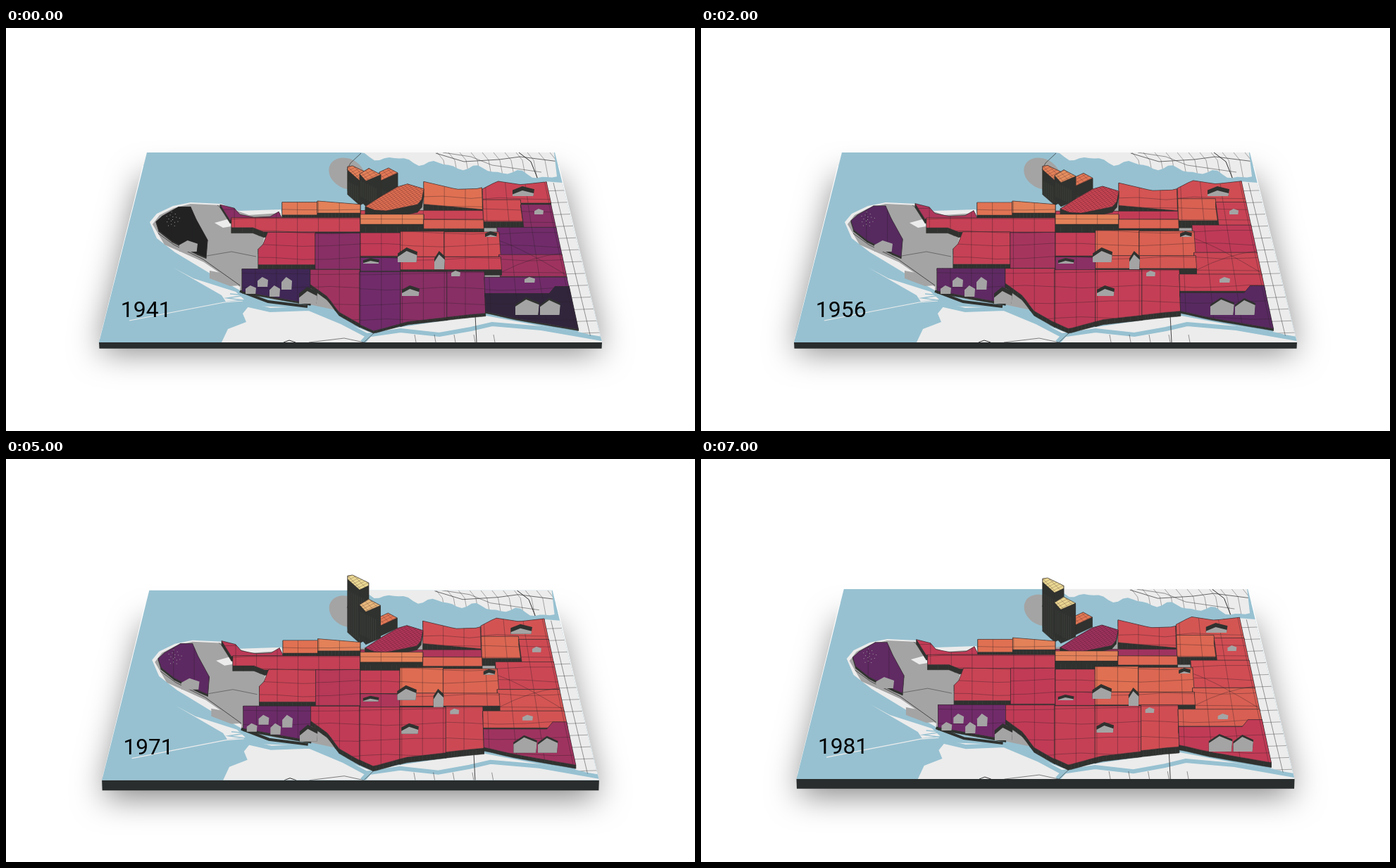
Write an HTML page with a canvas that moves like this. It is 978x573 px and loops after 8 s.

```html
<!DOCTYPE html>
<html lang="en">
<head>
<meta charset="utf-8">
<title>City density by year</title>
<style>
html, body { margin: 0; width: 100%; height: 100%; overflow: hidden; background: #fff; }
canvas { display: block; width: 978px; height: 573px; }
</style>
</head>
<body>
<canvas id="map" width="978" height="573"></canvas>
<script>
const ctx = document.getElementById('map').getContext('2d');
const STEP = 1000, STEPS = 8;
const SEA = '#97c1d1', LAND = '#ececec', PARK = '#a4a4a4', WALL = '#30322f', ROAD = '#303030';

const pts = s => s.split(' ').map(p => p.split(',').map(Number));
const sigmoid = t => 1 / (1 + Math.exp(-t));
const mix = (a, b, t) => a + (b - a) * t;

// Piecewise linear curve through a few key points
const through = s => {
  const p = pts(s);
  return x => {
    let i = 1;
    while (i < p.length - 1 && x > p[i][0]) i++;
    const [ax, ay] = p[i - 1], [bx, by] = p[i];
    return mix(ay, by, Math.min(1, Math.max(0, (x - ax) / (bx - ax))));
  };
};

// Density runs from 0 to 16
const SHADES = ['#222222', '#3f2756', '#712b6a', '#9f335f', '#c13b56', '#d04d53', '#e07052', '#e59260', '#ead993'];
function shade(density) {
  const i = Math.min(7, Math.floor(density / 2)), t = density / 2 - i;
  const channel = n => Math.round(mix(
    parseInt(SHADES[i].slice(n, n + 2), 16), parseInt(SHADES[i + 1].slice(n, n + 2), 16), t));
  return `rgb(${channel(1)},${channel(3)},${channel(5)})`;
}
const blockHeight = density => 1.5 + .4 * density + .035 * density ** 2;

// Streets are upright in the west and lean out towards the east
const street = (x, y) => x + (y - 250) * Math.max(0, x - 660) * .0019;
const harbour = through('593,220 640,231 673,230 700,217 735,222 774,218');
const river = through('432,363 457,381 472,402 500,418 522,428 570,415 677,403 706,412 774,428');

// A block between two streets and two edges; an edge is a height or a curve
function cell(west, east, north, south) {
  const n = 12, out = [];
  const add = (x, edge) => {
    const y = typeof edge === 'function' ? edge(x) : edge;
    out.push([street(x, y), y]);
  };
  for (let i = 0; i <= n; i++) add(mix(west, east, i / n), north);
  for (let i = n; i >= 0; i--) add(mix(west, east, i / n), south);
  return out;
}

// Density moves from the first to the last year along a power curve
const district = (outline, first, last, pace = .35) =>
  ({ outline, density: i => mix(first, last, (i / (STEPS - 1)) ** pace) });

const CAMPUS = district(pts('213,274 222,266 245,253 262,253 270,271 286,300 284,325 272,320 236,302 217,287'), 0, 3.3, .1);
const POINT = district(pts('304,250 324,255 332,264 352,268 375,267 387,260 393,272 318,272'), 5, 8);
const CORE = district(pts('510,256 535,240 556,228 570,224 593,231 590,246 584,253 540,262 523,261'), 12, 6, .6);

// Back to front
const BACK = [
  CAMPUS,
  district(cell(677, 774, harbour, 248), 9, 10.5),
  district(cell(593, 676, harbour, x => 252 + (x - 593) * .09), 12, 10, .2),
  district(cell(503, 677, 260, 275), 9, 6, 1)
];
const FRONT = [
  district(cell(677, 731, 243, 274), 10, 11.5, .2),
  POINT,
  district(cell(392, 442, 248, 266), 12.5, 12),
  district(cell(442, 503, x => 246 + (x - 442) * .08, 263), 13, 13),
  district(cell(731, 774, 248, 281), 5, 10, .2),
  district(cell(320, 503, 270, x => x < 362 ? 284 : 290), 9, 8.5),
  district(cell(503, 593, 265, 279), 13, 13),
  district(cell(593, 677, 272, 285), 11, 11.5),
  district(cell(695, 774, 281, 320), 4, 10),
  district(cell(358, 439, x => x < 370 ? 314 - (x - 358) : 290, 336), 8, 9),
  district(cell(439, 503, 291, 342), 5, 8, .6),
  district(cell(503, 560, 291, 324), 8, 8.5),
  district(cell(560, 622, 288, 324), 10, 12),
  district(cell(622, 697, 289, 324), 10, 11.5, .25),
  district(cell(695, 774, 320, 351), 6, 11),
  district(cell(503, 560, 326, 345), 4, 8, 1),
  district(cell(560, 697, 324, 342), 9, 11, .2),
  district(cell(335, 432, 342, x => 374 + (x - 335) * .18), 2, 4),
  district(cell(432, 502, 342, river), 6, 8, .1),
  district(cell(502, 560, 344, river), 4, 8.5, .15),
  district(cell(560, 626, 344, river), 5, 9, .15),
  district(cell(626, 676, 344, river), 5, 10, .3),
  district(cell(676, 774, 351, 375), 4, 11, .3),
  district(cell(676, 774, x => x < 755 ? 377 : 367, river), 1, 8, 1)
];

// Towers: outline at ground level
const TOWERS = [
  {
    outline: pts('485,232 492,231 515,242 515,246 502,252 485,237'),
    height: i => 35 + 41 * sigmoid((i - 3.4) * 3) - 3 * Math.max(0, i - 5),
    density: i => 13 + 3 * sigmoid((i - 3.2) * 3)
  },
  {
    outline: pts('530,230 543,224 556,231 532,242'),
    height: i => 14 + 11 * Math.exp(-i / 1.8),
    density: () => 12.5
  },
  {
    outline: pts('502,244 515,236 532,245 511,254'),
    height: i => 34 + 2.5 * Math.exp(-i) + 14 * sigmoid((i - 4.3) * 3),
    density: i => 13 + i * .42
  }
];

function trace(p, dy = 0) {
  ctx.beginPath();
  p.forEach(([x, y], i) => i ? ctx.lineTo(x, y + dy) : ctx.moveTo(x, y + dy));
}
function fill(p, color, dy = 0) {
  trace(p, dy);
  ctx.closePath();
  ctx.fillStyle = color;
  ctx.fill();
}
function line(path, color, width) {
  trace(pts(path));
  ctx.strokeStyle = color;
  ctx.lineWidth = width;
  ctx.stroke();
}
function clipped(p, dy, draw) {
  ctx.save();
  trace(p, dy);
  ctx.closePath();
  ctx.clip();
  ctx.translate(0, dy);
  draw();
  ctx.restore();
}

function streets() {
  ctx.beginPath();
  for (let x = 205; x < 800; x += 29.8) {
    ctx.moveTo(street(x, 210), 210);
    ctx.lineTo(street(x, 440), 440);
  }
  for (let y = 242, gap = 15; y < 430; y += gap++) {
    ctx.moveTo(300, y);
    for (let x = 340; x <= 820; x += 40) ctx.lineTo(x, y + 2 * Math.sin(x * y));
  }
  ctx.moveTo(700, 300);
  ctx.quadraticCurveTo(735, 312, 797, 350);
  ctx.moveTo(703, 345);
  ctx.quadraticCurveTo(748, 322, 789, 318);
  ctx.strokeStyle = 'rgba(42,32,38,.5)';
  ctx.lineWidth = .7;
  ctx.stroke();
}

function fineGrid(gap) {
  ctx.beginPath();
  for (let x = 240; x < 780; x += gap) {
    ctx.moveTo(x, 140);
    ctx.lineTo(x + 130, 270);
    ctx.moveTo(x, 280);
    ctx.lineTo(x + 260, 150);
  }
  ctx.strokeStyle = 'rgba(60,20,30,.45)';
  ctx.lineWidth = .6;
  ctx.stroke();
}

function block(outline, dy, height, color, pattern) {
  ctx.fillStyle = ctx.strokeStyle = WALL;
  ctx.lineWidth = .5;
  outline.forEach(([ax, ay], i) => {
    const [bx, by] = outline[(i + 1) % outline.length];
    trace([[ax, ay], [bx, by], [bx, by + height], [ax, ay + height]], dy);
    ctx.closePath();
    ctx.fill();
    ctx.stroke();
  });
  fill(outline, color, dy);
  clipped(outline, dy, pattern);
  trace(outline, dy);
  ctx.closePath();
  ctx.strokeStyle = 'rgba(48,40,44,.6)';
  ctx.lineWidth = .7;
  ctx.stroke();
}

// Outlines show the roofs at step 1
function drawDistrict(d, i, pattern = streets) {
  const h = blockHeight(d.density(i));
  block(d.outline, blockHeight(d.density(1)) - h, h, shade(d.density(i)), pattern);
}

function drawTower(t, i) {
  const h = t.height(i), left = t.outline[0][0];
  block(t.outline, -h, h, shade(t.density(i)), () => fineGrid(9));
  ctx.beginPath();
  for (let x = left + 2; x < left + 26; x += 3) {
    const y = 239 + (x - left) * .5;
    ctx.moveTo(x, y - h + 14);
    ctx.lineTo(x, y);
  }
  ctx.strokeStyle = 'rgba(100,100,95,.3)';
  ctx.lineWidth = .8;
  ctx.stroke();
}

// Unbuilt pocket; a deep one shows its north wall
function pocket(x, y, w, h, deep) {
  const p = [[x, y + h * .4], [x + w * .45, y], [x + w, y + h * .3], [x + w * .95, y + h], [x, y + h]];
  fill(p, deep ? WALL : PARK);
  if (deep) clipped(p, 0, () => fill(p, PARK, deep));
}

function pockets() {
  pocket(556, 312, 28, 21, 5);
  pocket(608, 317, 15, 26, 5);
  pocket(507, 327, 23, 8, 4);
  pocket(562, 366, 25, 15, 5);
  pocket(723, 383, 34, 25, 3);
  pocket(758, 384, 29, 24, 3);
  pocket(719, 225, 31, 14, 6);
  pocket(680, 289, 17, 8, 5);
  pocket(416, 368, 26, 24, 6);
  pocket(246, 302, 26, 16);
  pocket(632, 345, 13, 8);
  pocket(750, 257, 13, 8);
  pocket(736, 354, 15, 8);
  for (let i = 0; i < 4; i++) pocket(340 + i * 17, 366 - i % 2 * 12, 15, 12 + i * 2);
}

function coast() {
  const p = [[503, 177]];
  for (let x = 509; x <= 788; x += 7) p.push([x, 181 + (x - 503) * .115 + 3.5 * Math.sin(x * .11) + 2 * Math.sin(x * .7)]);
  return [...p, [778, 177]];
}
const NORTH_SHORE = coast();
const EAST_SIDE = pts('764,218 790,220 846,447 825,435 812,432');

function outerRoads() {
  clipped(NORTH_SHORE, 0, () => {
    for (let x = 612; x < 790; x += 16) line(`${x},177 ${x + 9},188 ${x + 14},215`, ROAD, .4);
    line('610,178 650,190 700,187 730,183 785,190', ROAD, .7);
    line('620,177 660,183 690,195 760,205', ROAD, .5);
    line('728,177 745,190 755,215', ROAD, 1);
  });
  clipped(EAST_SIDE, 0, () => {
    for (let y = 232; y < 440; y += 17) line(`760,${y} 846,${y - 3}`, ROAD, .4);
    line('777,220 830,440', ROAD, .5);
  });
  for (let x = 580; x < 700; x += 28) line(`${x},436 ${x + 2},447`, ROAD, .5);
  line('666,408 668,447', ROAD, .9);
  line('524,432 508,447 480,441 430,447', ROAD, .6);
  line('394,447 402,444 411,447', ROAD, 1);
}

function ground() {
  fill(NORTH_SHORE, LAND);
  fill(EAST_SIDE, LAND);
  fill(pts('306,447 315,428 341,418 336,406 345,395 428,398 478,418 515,432 676,408 846,440 846,447'), LAND);
  line('340,393 375,401 430,399 478,419 512,437 560,430 615,436 660,428 690,421 760,427 846,442', SEA, 6);
  line('506,447 516,436', SEA, 7);

  // Western peninsula
  fill(pts('204,276 214,264 237,253 262,248 306,250 330,260 390,258 400,300 360,371 332,373 298,354 240,319 214,299'), LAND);
  fill(pts('208,279 218,266 238,256 262,250 305,252 345,266 390,263 367,296 357,340 332,368 281,333 225,308'), PARK);
  fill(pts('296,277 318,271 320,282 308,284'), LAND);
  fill(pts('289,345 310,349 332,366 318,367 289,356'), PARK);
  fill(pts('238,341 266,356 326,375 338,386 312,389 306,380'), LAND);
  fill(pts('335,345 500,260 765,220 810,428 680,404 524,428 473,402 430,393 380,386 332,372'), PARK);

  ctx.beginPath();
  ctx.ellipse(484, 207, 27, 21, .5, 0, 7);
  ctx.fillStyle = PARK;
  ctx.fill();

  line('175,416 310,390 336,388', LAND, 1.2);
  line('318,378 340,380 314,384 336,387', SEA, 1.5);
  line('332,374 372,389 428,396', WALL, 4);
  line('216,292 238,308 280,329 332,366', ROAD, .8);
  line('285,324 320,318 355,325', ROAD, .5);
  line('300,252 318,265 360,296', ROAD, .5);
  line('504,178 489,192 484,202', ROAD, .7);
  outerRoads();
}

function specks() {
  ctx.fillStyle = PARK;
  for (let i = 0; i < 16; i++) {
    const a = i * 2.4, r = 2.8 * Math.sqrt(i);
    ctx.fillRect(236 + r * Math.cos(a), 272 + r * Math.sin(a), 1, 1);
  }
}

// The camera backs off as the tallest tower grows
function draw(i) {
  const lift = Math.max(0, (TOWERS[0].height(i) - 41) * .28);
  const slab = 8.7 + lift * .6, scale = 1 - lift * .0012;
  const plate = pts('200,177 779,177 846,447 132,447');
  ctx.setTransform(1, 0, 0, 1, 0, 0);
  ctx.fillStyle = '#fff';
  ctx.fillRect(0, 0, 978, 573);
  ctx.setTransform(scale, 0, 0, 1, 489.5 * (1 - scale), lift);

  ctx.save();
  ctx.shadowColor = 'rgba(0,0,0,.5)';
  ctx.shadowBlur = 46;
  ctx.shadowOffsetY = slab * 2;
  fill(pts('194,196 785,196 845,442 133,442'), '#fff');
  ctx.restore();

  fill([[132, 447], [846, 447], [845.5, 447 + slab], [132.5, 447 + slab]], '#292d2d');
  fill(plate, SEA);
  clipped(plate, 0, ground);

  BACK.forEach(d => drawDistrict(d, i));
  specks();
  TOWERS.forEach(t => drawTower(t, i));
  drawDistrict(CORE, i, () => fineGrid(6));
  FRONT.forEach(d => drawDistrict(d, i));
  pockets();

  ctx.fillStyle = '#000';
  ctx.font = '32px Roboto, Arial, sans-serif';
  ctx.fillText(i ? 1946 + 5 * i : 1941, 162.7, 410.5);
}

let shown = -1;
function tick() {
  const i = Math.floor(performance.now() / STEP) % STEPS;
  if (i !== shown) draw(shown = i);
  requestAnimationFrame(tick);
}
tick();
</script>
</body>
</html>
```
